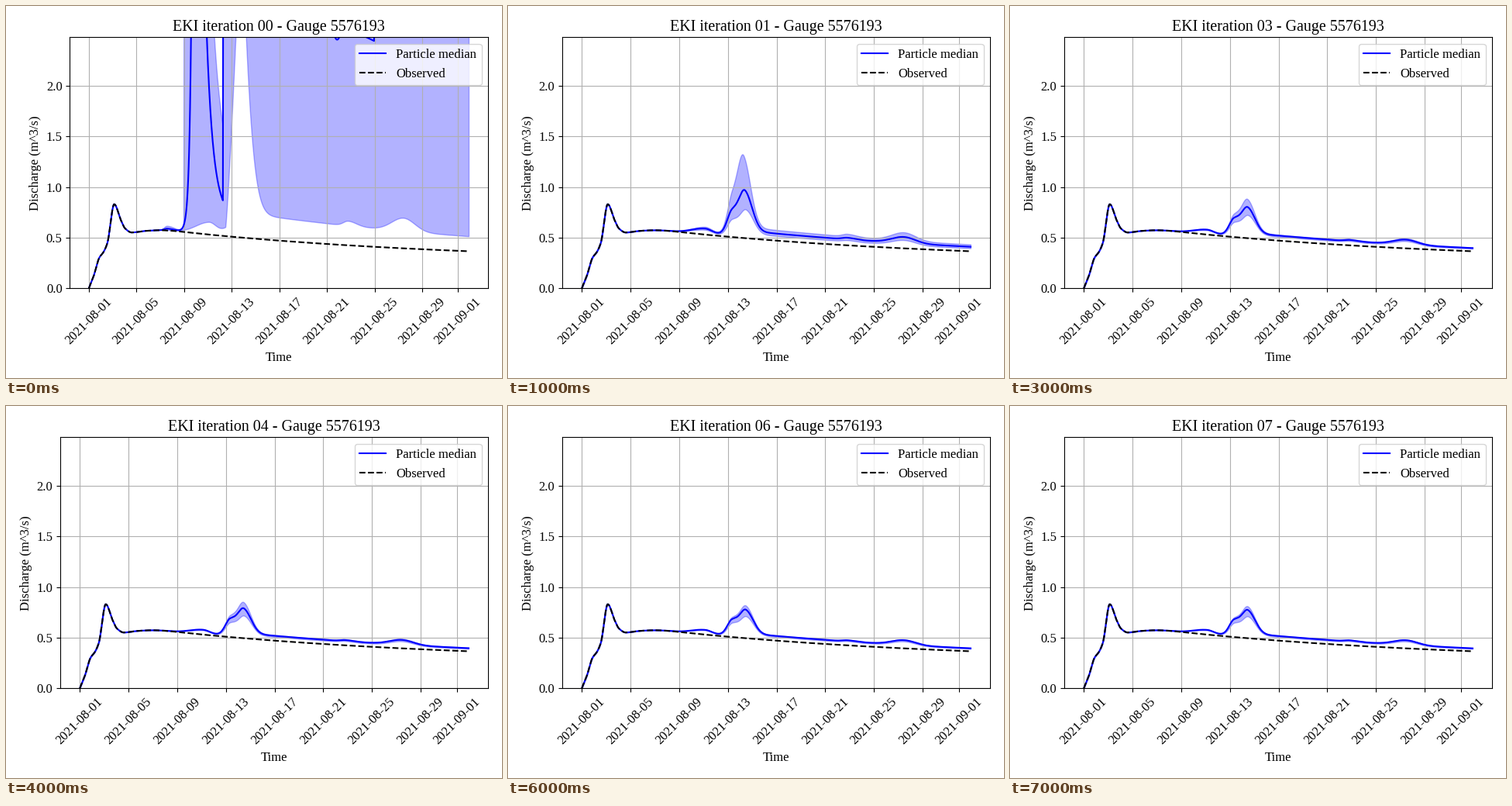
Animation, 640 px wide and 480 px high, one loop 8000 ms. Source, as a matplotlib script:

```python
import numpy as np
import matplotlib.pyplot as plt
from matplotlib.animation import FuncAnimation

plt.rcParams["font.family"] = "Liberation Serif"
plt.rcParams["font.size"] = 12

W, H = 640, 480
N_ITER = 8
T = np.arange(0, 32 - 1 / 24, 0.02)   # days since 2021-08-01

# Flood wave of the first days: (day, discharge)
RISE = [(0, 0), (.4, .12), (.87, .3), (1.24, .36), (1.56, .45), (2.13, .83),
        (2.7, .67), (3.05, .59), (3.6, .551), (4.8, .567), (6, .573)]

# Smaller rain responses: (day, rise time, fall time, height, gain exponent)
SHOWERS = [(10.1, 1.1, .6, .045, .45), (21.8, .4, .7, .011, .7),
           (26.45, 1, .95, .046, .5)]


def smooth(points):
    """Monotone cubic curve through the points, sampled at T."""
    x, y = np.array(points, float).T
    h = np.diff(x)
    s = np.diff(y) / h
    m = np.concatenate([s[:1], np.zeros(len(x) - 2), s[-1:]])
    same = s[:-1] * s[1:] > 0
    a, b = s[:-1][same], s[1:][same]
    m[1:-1][same] = 2 * a * b / (a + b)
    k = np.clip(np.searchsorted(x, T, side="right") - 1, 0, len(h) - 1)
    u = (T - x[k]) / h[k]
    return (y[k] * (1 + 2 * u) * (1 - u) ** 2 + y[k + 1] * u * u * (3 - 2 * u)
            + h[k] * u * (1 - u) * (m[k] * (1 - u) - m[k + 1] * u))


def bump(day, rise, fall, height):
    """Bell curve with separate widths before and after its peak."""
    d = T - day
    return height * np.exp(-0.5 * (d / np.where(d < 0, rise, fall)) ** 2)


def recession(t):
    return .25 + .305 * np.exp(-(t - 8) / 24.6)


def wetness(gain):
    """Raised flow after the second flood, plus the showers."""
    tail = .05 * np.exp(-(T - 12) / 36) / (1 + np.exp(-(T - 11.9) / .5))
    return gain ** .78 * tail + sum(
        bump(day, rise, fall, height * gain ** power)
        for day, rise, fall, height, power in SHOWERS)


def flood(gain):
    """Second flood: a shoulder, then a peak that comes earlier when larger."""
    return (bump(12.35, .4, .6, .13 * gain ** .8)
            + bump(13.5 - .11 * (gain - 1), .45, .6, .205 * gain))


def gains(i):
    """Gain of the low, median and high curve after update i."""
    if i < 3:
        return [(1.04, 1.75, 3), (1, 1.55, 2.78)][i - 1]
    decay = .65 ** (i - 3)
    return .77 + .06 * decay, 1 + .13 * decay, 1.1 + .33 * decay


def prior():
    """Uncalibrated ensemble, running far off the scale."""
    off = 3
    surge = .18 * np.exp(5.5 * (T - 8.15))
    climb = 2.15 * np.maximum(T - 11.5, 0) ** 1.2
    low = observed + wetness(7.9) + np.minimum(
        climb, bump(11.5, 1.085, 1.085, 6.3))

    start = observed + bump(6.6, .25, .6, .018) + surge
    drain = .7 + 1.78 * np.exp(-1.75 * (T - 9.91))
    dip = np.minimum(off, 2.455 + .8 * (T - 20.86) ** 2)
    ramp = 2.443 + .056 * (23.96 - T)
    median = np.select([T < 11.28, (T > 23) & (T < 23.97)],
                       [np.minimum(start, drain), ramp], dip)

    wedge = 1 + 1.48 * np.exp(-1.25 * (T - 10.56))
    high = np.select([T < 8, (T > 10) & (T < 11.28)],
                     [start + bump(6.6, .25, .6, .024), wedge], off)
    return low, median, high


observed = smooth(RISE + [(d, recession(d)) for d in range(7, 33)])
curves = [prior()] + [[observed + wetness(g) + flood(g) for g in gains(i)]
                      for i in range(1, N_ITER)]

days = [*range(0, 32, 4), 31]
labels = [f"2021-{8 + d // 31:02d}-{d % 31 + 1:02d}" for d in days]
margin = 0.05 * T[-1]

fig = plt.figure(figsize=(W / 100, H / 100), dpi=100)
ax = fig.add_subplot()


def draw(i):
    low, median, high = curves[i]
    left = 82.4 if i == 0 else 70.2
    ax.clear()
    ax.set_position([left / W, 115.8 / H, (622 - left) / W, 324 / H])
    ax.fill_between(T, low, high, color="b", alpha=0.3)
    ax.plot(T, median, "b-", label="Particle median")
    ax.plot(T, observed, "k--", label="Observed")
    ax.set_xticks(days, labels, rotation=45)
    ax.set_yticks(np.arange(0, 2.1, 0.5))
    ax.set_xlim(-margin, T[-1] + margin)
    ax.set_ylim(0, 2.48)
    ax.grid(True)
    ax.set_xlabel("Time")
    ax.set_ylabel("Discharge (m^3/s)")
    ax.set_title(f"EKI iteration {i:02d} - Gauge 5576193")
    ax.legend(loc="upper right")
    return []


anim = FuncAnimation(fig, draw, frames=N_ITER, init_func=lambda: draw(0),
                     interval=1000, repeat=True, repeat_delay=0)
plt.show()
```
